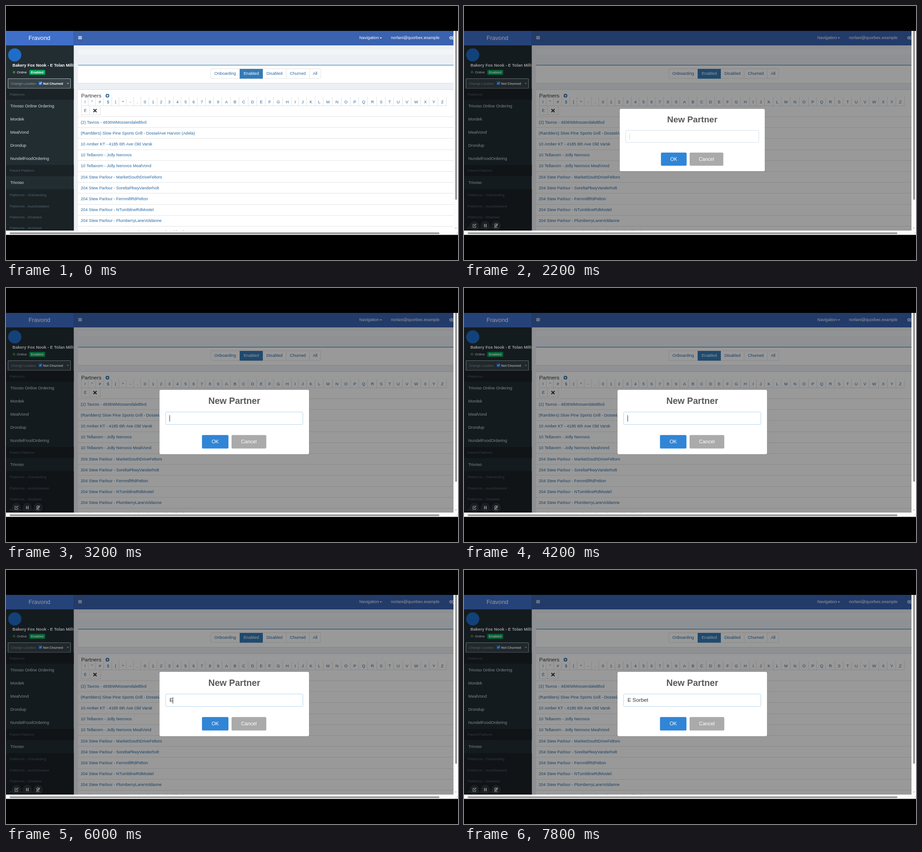
Write an HTML page with a canvas that moves like this. It is 998 px wide and 561 px high and loops after 8000 ms.

```html
<!DOCTYPE html>
<html lang="en">
<head>
<meta charset="utf-8">
<title>New partner dialog</title>
<style>
html, body { margin: 0; width: 100%; height: 100%; overflow: hidden; background: #000; }
canvas { display: block; }
</style>
</head>
<body>
<canvas id="stage" width="998" height="561"></canvas>
<script>
const ctx = document.getElementById('stage').getContext('2d');
const LOOP = 8000;
const FONT = '"Liberation Sans", Arial, sans-serif';
const BASE = 9.16;
const BLUE = '#337ab7';
const LINK = '#2b69a3';

const platforms = ['Trivoso Online Ordering', 'Mordek', 'MealVond', 'Drondup', 'NundelFoodOrdering'];
const groups = ['Onboarding', 'AutoDisabled', 'Disabled', 'Archived'];
const partners = [
  '(2) Tavros - 4836WMossendaleBlvd',
  '(Ramblers) Slow Pine Sports Grill - DosselAve Harvon (Adela)',
  '10 Amber KT - 4185 6th Ave Old Varsk',
  '10 Tellavorn - Jolly Nerovos',
  '10 Tellavorn - Jolly Nerovos MealVond',
  '204 Stew Parlour - MarketSouthDriveFeltors',
  '204 Stew Parlour - SoreltaPkwyVanderholt',
  '204 Stew Parlour - FernmillRdPelton',
  '204 Stew Parlour - NTumblineRdMostel',
  '204 Stew Parlour - PlumberryLaneVoldanne',
  '11 Elm Trattor - Tasty Mini Garden 6th StEMarbrookland'
];
const typed = [[6000, 'E'], [6400, 'E S'], [6800, 'E Sor'], [7000, 'E Sorb'], [7200, 'E Sorbe'], [7400, 'E Sorbet']];
const caretOff = [[2600, 3200], [3600, 4200], [4800, 5200], [7800, 8000]];

function rect(x, y, w, h, color) {
  ctx.fillStyle = color;
  ctx.fillRect(x, y, w, h);
}

function round(x, y, w, h, r, fill, stroke) {
  ctx.beginPath();
  ctx.roundRect(x, y, w, h, r);
  if (fill) { ctx.fillStyle = fill; ctx.fill(); }
  if (stroke) { ctx.strokeStyle = stroke; ctx.lineWidth = 1; ctx.stroke(); }
}

function disc(x, y, r, color) {
  ctx.fillStyle = color;
  ctx.beginPath();
  ctx.arc(x, y, r, 0, Math.PI * 2);
  ctx.fill();
}

function ring(x, y, r, color, width) {
  ctx.strokeStyle = color;
  ctx.lineWidth = width;
  ctx.beginPath();
  ctx.arc(x, y, r, 0, Math.PI * 2);
  ctx.stroke();
}

function line(points, color, width = 1) {
  ctx.strokeStyle = color;
  ctx.lineWidth = width;
  ctx.beginPath();
  points.forEach(([x, y]) => ctx.lineTo(x, y));
  ctx.stroke();
}

function down(x, y, w, color) {
  ctx.fillStyle = color;
  ctx.beginPath();
  ctx.moveTo(x, y);
  ctx.lineTo(x + w, y);
  ctx.lineTo(x + w / 2, y + w / 2);
  ctx.fill();
}

function text(str, x, y, color, size = BASE, bold = false, align = 'left') {
  ctx.font = (bold ? 'bold ' : '') + size + 'px ' + FONT;
  ctx.textAlign = align;
  ctx.fillStyle = color;
  ctx.fillText(str, x, y);
}

function clipped(x, y, w, h, draw) {
  ctx.save();
  ctx.beginPath();
  ctx.rect(x, y, w, h);
  ctx.clip();
  draw();
  ctx.restore();
}

function navbar() {
  rect(149, 55, 839, 32, '#3a62ae');
  for (const y of [66.8, 69.3, 71.8]) rect(159.5, y, 8, 1.4, '#fff');
  text('Navigation', 780, 73.4, '#fff');
  down(825, 69.5, 5.2, '#fff');
  text('norlani@quorbex.example', 850, 73.4, '#fff');
  ctx.setLineDash([1.4, 1]);
  ring(982.3, 70.3, 2.9, '#fff', 1.4);
  ring(987, 68, 1.6, '#fff', 1.4);
  ring(987, 72.6, 1.6, '#fff', 1.4);
  ctx.setLineDash([]);
  ring(982.3, 70.3, 2, '#fff', 1);
}

function sidebar() {
  const dark = '#1a2226', muted = '#4b646f', label = '#d3dce1';
  rect(0, 55, 150, 441, '#222d32');
  rect(0, 55, 150, 32, '#3f6fc9');
  text('Fravond', 73.7, 75, '#fff', 13.1, false, 'center');

  disc(19.3, 108, 14.6, '#1f6cc9');
  text('Bakery Fox Nook - E Tolan Mills', 14.3, 133.8, '#fff', BASE, true);
  disc(17.6, 146.2, 2.9, '#3c763d');
  text('Online', 24, 149, '#fff', 7.6);
  round(51.5, 141, 35, 11, 1.6, '#00a65a');
  text('Enabled', 69, 149, '#fff', 7.2, true, 'center');

  round(4.5, 160.5, 138, 21.5, 0.5, '#374348', '#a9b3b8');
  text('Change Location', 11, 174, '#8d989d', 7.3);
  round(72, 166.5, 8, 8, 1.2, '#1f74dc');
  line([[73.7, 170.6], [75.4, 172.4], [78.4, 168.4]], '#fff', 1.2);
  text('Not Churned', 82, 174, '#fff', 7.27, true);
  down(134, 170, 5, '#aab4b8');

  rect(0, 182.5, 150, 24.5, dark);
  text('Platforms', 8, 197.5, muted, 7.85);
  platforms.forEach((name, i) => text(name, 9.5, 224.3 + i * 28.95, label));
  rect(0, 351, 150, 25, dark);
  text('Parent Platform', 8, 366.3, muted, 7.85);
  text('Trivoso', 9.5, 393.2, label);
  rect(0, 404.5, 150, 92, dark);
  groups.forEach((name, i) => text('Platforms - ' + name, 8, 420.2 + i * 24.3, muted, 7.85));
}

function tabs() {
  const edges = [452, 516, 567, 618.5, 670, 695];
  const labels = ['Onboarding', 'Enabled', 'Disabled', 'Churned', 'All'];
  round(452, 138.5, 243, 21.5, 2, '#fff', '#e3e3e3');
  edges.slice(1, 5).forEach(x => rect(x - 0.5, 138.5, 1, 21.5, '#e3e3e3'));
  rect(516, 139, 51, 21.5, BLUE);
  labels.forEach((label, i) => {
    const mid = (edges[i] + edges[i + 1]) / 2;
    text(label, mid, 152.3, i === 1 ? '#fff' : LINK, BASE, false, 'center');
  });
}

function pager() {
  const chars = '!"#$(*-.0123456789ABCDEFGHIJKLMNOPQRSTUVWXYZ';
  const border = '#e0e0e0';
  let x = 166.8;
  rect(166, 201, 1, 19.5, border);
  for (const c of chars) {
    ctx.font = BASE + 'px ' + FONT;
    const w = ctx.measureText(c).width + 12.85;
    text(c, x + w / 2, 214.6, LINK, BASE, false, 'center');
    x += w;
    rect(Math.round(x) - 1, 201, 1, 19.5, border);
  }
  rect(166, 220, x - 166, 1, border);
  rect(166, 240, 43, 1, border);
  for (const bx of [166, 184, 208]) rect(bx, 221, 1, 19.5, border);
  text('É', 175, 234.2, LINK, BASE, false, 'center');
  line([[193, 227.5], [200, 234.5]], '#333', 2.2);
  line([[200, 227.5], [193, 234.5]], '#333', 2.2);
}

function content() {
  rect(149, 87, 839, 409, '#ecf0f5');
  rect(159, 96, 829, 11, '#f2f4f6');
  rect(159, 130, 829, 1.5, '#3c8dbc');
  rect(159, 131.5, 829, 39, '#fff');
  rect(159, 170, 829, 1, '#d9dde1');
  rect(159, 184, 829, 1.2, '#d2d6de');
  rect(159, 185, 829, 311, '#fff');
  tabs();

  text('Partners', 166, 201.6, '#333', 11.8);
  disc(224, 198.2, 4.1, LINK);
  rect(221.6, 197.5, 4.8, 1.4, '#fff');
  rect(223.3, 195.8, 1.4, 4.8, '#fff');
  pager();

  partners.forEach((name, i) => {
    const y = 244 + i * 24.2;
    rect(159, Math.round(y), 829, 1, '#e2e3e4');
    text(name, 165, y + 15.6, LINK);
  });
}

function scrollbars() {
  rect(988, 55, 10, 450, '#fcfcfc');
  rect(0, 496, 998, 9.5, '#fcfcfc');
  round(992, 55, 3.6, 373, [0, 0, 1.8, 1.8], '#8b8b8b');
  round(8, 500.2, 949, 3.2, 1.6, '#8b8b8b');
  down(991, 489.5, 4.6, '#b5b5b5');
  line([[993, 504.5], [997.5, 500]], '#b5b5b5');
}

function recorder(strength) {
  const tone = '#a4a8aa';
  ctx.save();
  ctx.shadowColor = 'rgba(0,0,0,.3)';
  ctx.shadowBlur = 5;
  for (const x of [23, 47, 71]) disc(x, 485, 10.5, 'rgba(34,38,40,.72)');
  ctx.shadowColor = 'transparent';
  ctx.globalAlpha = strength;
  line([[23.5, 482], [19.8, 482], [19.8, 489], [26, 489], [26, 485.8]], tone);
  line([[22, 486.3], [27, 481]], tone, 1.3);
  rect(44.5, 481.5, 1.7, 7, tone);
  rect(48, 481.5, 1.7, 7, tone);
  ring(70.5, 483.8, 2.7, tone, 1.1);
  line([[67, 489.3], [74, 489.3]], tone, 1.1);
  line([[67.3, 488.5], [74.8, 481]], tone, 1.1);
  ctx.restore();
}

function dialog(t) {
  const opening = t < 2400;
  const scale = opening ? 0.97 : 1;
  ctx.save();
  ctx.translate(504, 296);
  ctx.scale(scale, scale);
  ctx.translate(-504, -296);
  round(339, 225, 330, 142, 3.3, '#fff');
  text('New Partner', 504, 255.7, '#595959', 19.65, true, 'center');
  round(352.5, 273.9, 303, 27.6, 2, '#fff', opening ? '#d3dde8' : '#b4d6ec');
  round(432.7, 324.7, 58.5, 29.8, 2.6, '#3085d6');
  round(498, 324.7, 76.7, 29.8, 2.6, '#aaa');
  text('OK', 462, 343.4, '#fff', 11.1, false, 'center');
  text('Cancel', 536.3, 343.4, '#fff', 11.1, false, 'center');

  const entry = typed.filter(([at]) => t >= at).pop();
  const value = entry ? entry[1] : '';
  text(value, 361, 291.4, '#333', 11.77);
  if (!caretOff.some(([from, to]) => t >= from && t < to)) {
    const x = 361 + Math.floor(ctx.measureText(value).width);
    rect(x, 281, 1, 14, opening ? '#d4d4d4' : '#333');
  }
  ctx.restore();
}

function draw(t) {
  const open = t >= 2200;
  rect(0, 0, 998, 561, '#000');
  clipped(0, 55, 988, 441, () => {
    content();
    navbar();
    clipped(0, 55, 149.6, 441, sidebar);
    if (open) rect(0, 55, 988, 441, 'rgba(0,0,0,.4)');
  });
  scrollbars();
  if (t >= 1200) recorder(open ? 0.95 : 0.55);
  if (open) dialog(t);
}

const start = performance.now();
function tick() {
  draw((performance.now() - start) % LOOP);
  requestAnimationFrame(tick);
}
tick();
</script>
</body>
</html>
```
